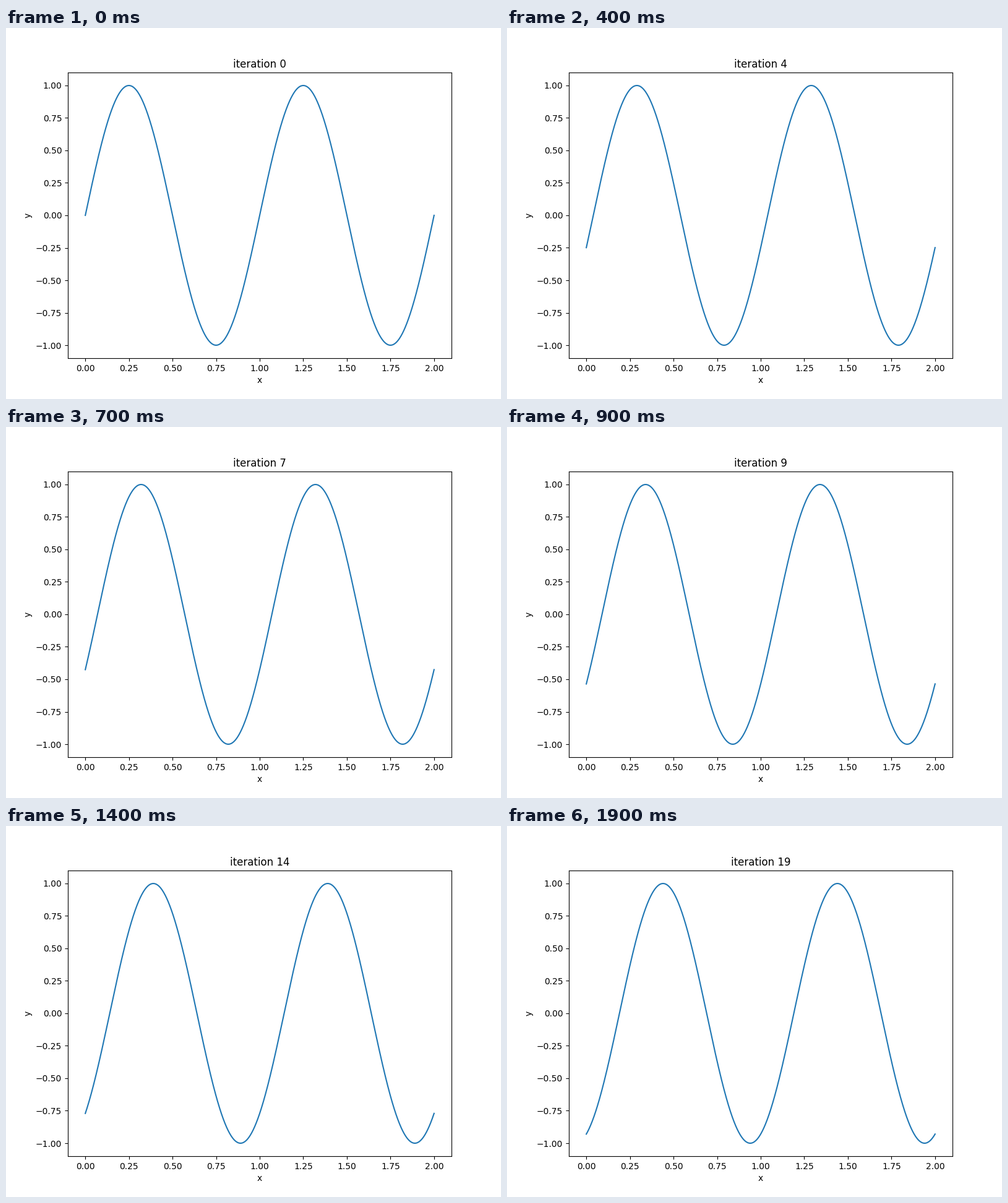
Write a matplotlib script that moves like this. It is 800x600 px and loops after 2 s.

```python
import numpy as np
import matplotlib.pyplot as plt
from matplotlib.animation import FuncAnimation

FRAMES = 20
INTERVAL = 100  # ms
SHIFT = 0.01    # wave travel per frame, in x units

x = np.linspace(0, 2, 1000)


def wave(i):
    return np.sin(2 * np.pi * (x - SHIFT * i))


fig, ax = plt.subplots(figsize=(8, 6), dpi=100)
line, = ax.plot(x, wave(0))
ax.set_xlabel("x")
ax.set_ylabel("y")
title = ax.set_title("iteration 0")


def update(i):
    line.set_data(x, wave(i))
    title.set_text(f"iteration {i}")
    # refit the limits to the sampled extremes
    ax.relim()
    ax.autoscale_view()
    return line, title


def init():
    return update(0)


anim = FuncAnimation(fig, update, frames=FRAMES, init_func=init,
                     interval=INTERVAL, repeat=True, repeat_delay=0)
plt.show()
```
